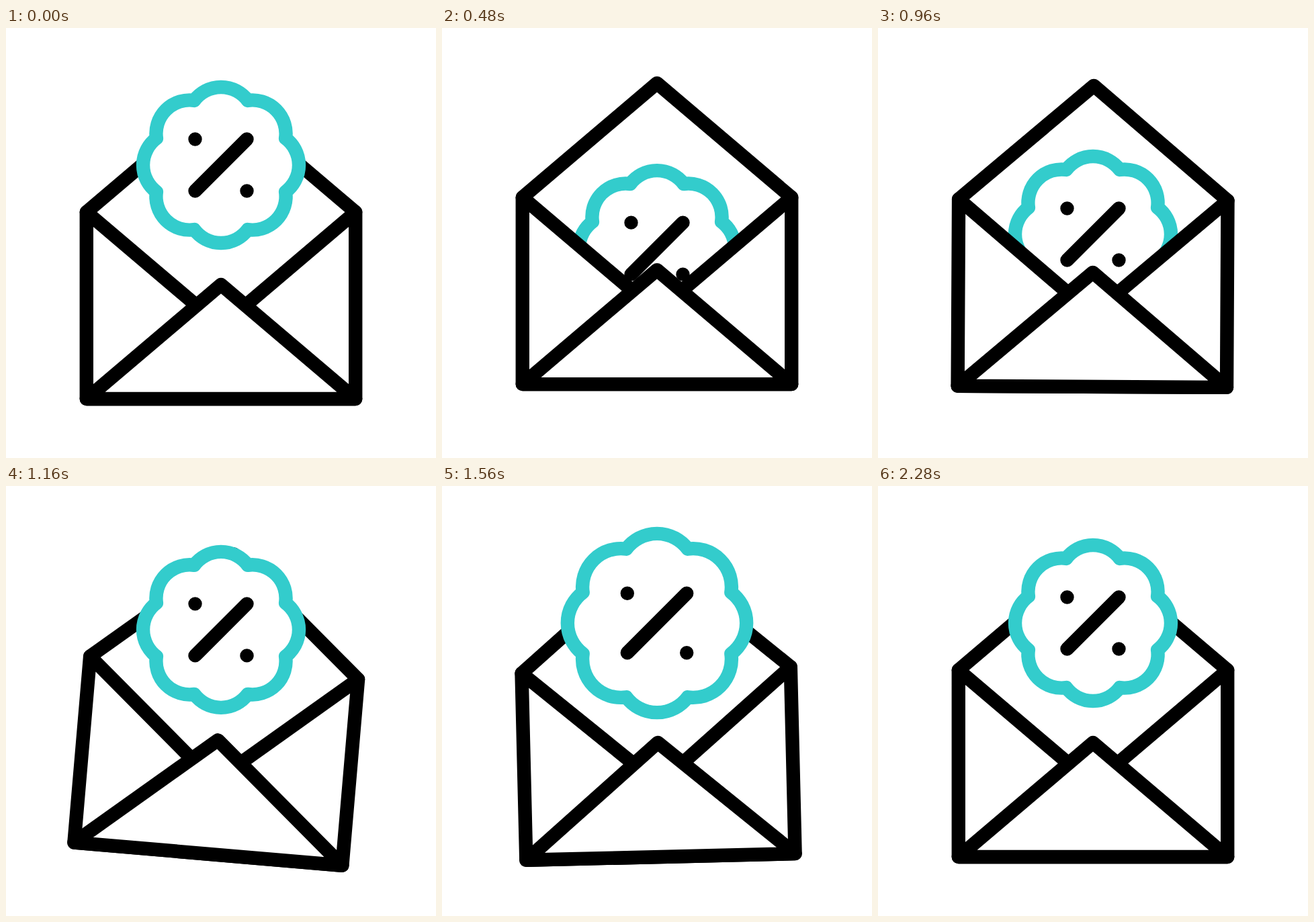
Recreate the animation shown at these times as an HTML page. Size 640x640 px, loop 2400 ms.

```html
<!DOCTYPE html>
<html lang="en">
<head>
<meta charset="utf-8">
<title>Discount mail</title>
<style>
  html, body { margin: 0; height: 100%; overflow: hidden; background: #fff; }
  svg { display: block; width: 100%; height: 100%; }
  path { fill: #fff; stroke: #000; stroke-width: 20.4; stroke-linecap: round; stroke-linejoin: round; }
  #badge path { stroke-width: inherit; }
  #seal { stroke: #33cccc; }
</style>
</head>
<body>
<svg viewBox="0 0 640 640">
  <g class="envelope">
    <path d="M119.8 274L320 104 520.2 274"/>
  </g>
  <g id="badge">
    <path id="seal"/>
    <path d="M-38.5 38.5L38.5 -38.5M-38.5 -38.5h0M38.5 38.5h0"/>
  </g>
  <g class="envelope">
    <path d="M119.8 274L320 444 520.2 274V552H119.8Z"/>
    <path d="M119.8 552L320 382 520.2 552Z"/>
  </g>
</svg>
<script>
  const LOOP = 2400, STEP = 40, STROKE = 20.4;
  const badge = document.getElementById('badge');
  const envelopes = document.querySelectorAll('.envelope');

  // Smooth 0 to 1 between two times.
  function ease(t, from, to) {
    const u = Math.min(1, Math.max(0, (t - from) / (to - from)));
    return u * u * (3 - 2 * u);
  }

  // Eight round lobes meeting at notches on a circle.
  function sealPath(radius, lobe) {
    let d = '';
    for (let i = 0; i <= 8; i++) {
      const angle = (i + 0.5) * Math.PI / 4;
      const point = `${radius * Math.cos(angle)} ${radius * Math.sin(angle)}`;
      d += i ? `A${lobe} ${lobe} 0 0 1 ${point}` : `M${point}`;
    }
    return d + 'Z';
  }

  function draw(t) {
    // The badge sinks into the rising envelope, pops out and swells; the envelope rocks.
    const lift = -25 * (ease(t, 40, 605) - ease(t, 796, 1272));
    const drop = 141 * (ease(t, 40, 601) - ease(t, 823, 1225));
    const zoom = 1 + 0.16 * (ease(t, 1160, 1640) - ease(t, 1680, 2100));
    const tilt = 6 * (ease(t, 914, 1253) - 2 * ease(t, 1338, 1722) + ease(t, 1803, 2280));

    badge.setAttribute('transform', `translate(320 ${204 + drop}) scale(${zoom})`);
    badge.setAttribute('stroke-width', STROKE / zoom);
    for (const part of envelopes) {
      part.setAttribute('transform', `translate(0 ${lift}) rotate(${tilt} 320 328)`);
    }
  }

  document.getElementById('seal').setAttribute('d', sealPath(104, 49.75));

  const start = performance.now();
  function tick() {
    const t = (performance.now() - start) % LOOP;
    draw(Math.floor(t / STEP) * STEP);
    requestAnimationFrame(tick);
  }
  tick();
</script>
</body>
</html>
```
